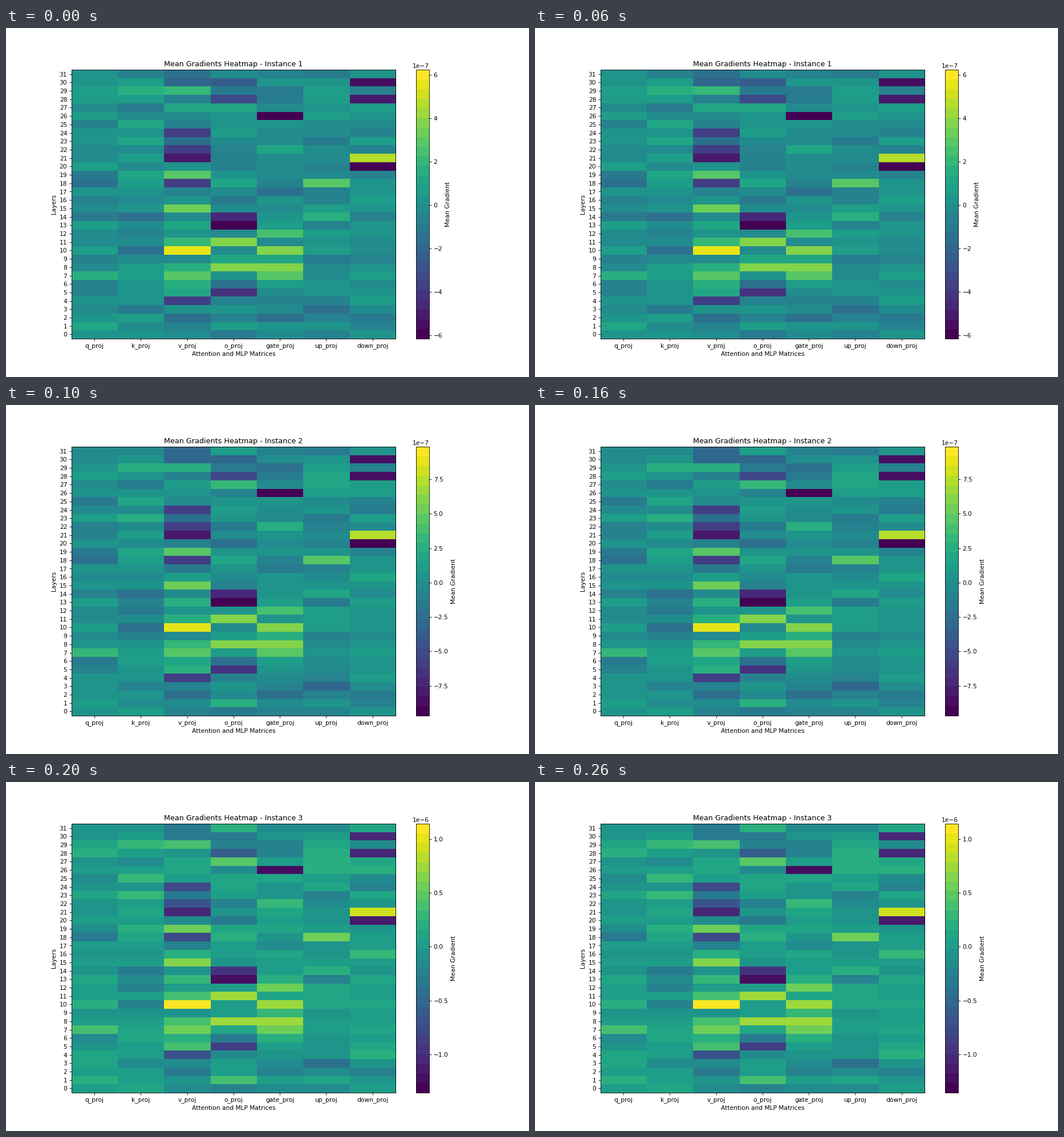
Animation, 917 px wide and 611 px high, one loop 0.3 s. Source, as a matplotlib script:

```python
import numpy as np
import matplotlib.pyplot as plt
from matplotlib.animation import FuncAnimation

W, H = 917, 611
DPI = W / 12
UNIT = 1e-7
LAYERS = 32
NAMES = ["q_proj", "k_proj", "v_proj", "o_proj", "gate_proj", "up_proj", "down_proj"]

# Colour limits of each instance, in UNIT
LIMITS = [(-6.165, 6.235), (-9.66, 9.85), (-13.52, 11.39)]
GROWTH = 2    # gradients double from the first instance to the last
BLEND = [0, 0.6, 1]

# The few strongest cells, layer: first level
PEAKS = {
    "v_proj": {4: -3.6, 7: 3, 10: 5.7, 15: 3.2, 18: -3.7, 19: 3, 21: -5, 22: -3.6, 24: -3.8},
    "o_proj": {5: -4.2, 8: 3.8, 11: 3.6, 13: -6, 14: -4.6, 28: -3.2},
    "gate_proj": {7: 3, 8: 3.8, 10: 3.6, 12: 2.6, 26: -6},
    "up_proj": {18: 2.9},
    "down_proj": {20: -5.8, 21: 4.6, 28: -5.2, 30: -5.3},
}


def make_levels():
    """First and last gradients: seeded noise, widest around v and o, plus peaks."""
    rng = np.random.default_rng(7)
    shape = (LAYERS, len(NAMES))
    spread = 0.7 + 0.6 * np.exp(-(np.arange(len(NAMES)) - 2.5) ** 2)
    first = spread * np.clip(rng.normal(0.1, 1, shape), -2, 2)
    drift = spread * np.clip(rng.normal(0.3, 1, shape), -2, 2)
    for name, cells in PEAKS.items():
        col = NAMES.index(name)
        for layer, level in cells.items():
            first[layer, col] = level
            drift[layer, col] = 0
    return first, GROWTH * first + drift


first, last = make_levels()

fig, ax = plt.subplots(figsize=((W + 0.01) / DPI, (H + 0.01) / DPI), dpi=DPI)
im = ax.imshow(first * UNIT, cmap=plt.get_cmap("viridis", 28), aspect="auto",
               origin="lower", interpolation="nearest",
               vmin=LIMITS[0][0] * UNIT, vmax=LIMITS[0][1] * UNIT)
fig.colorbar(im, ax=ax, label="Mean Gradient")
ax.set_xticks(range(len(NAMES)), NAMES)
ax.set_yticks(range(LAYERS))
ax.set_xlabel("Attention and MLP Matrices")
ax.set_ylabel("Layers")
title = ax.set_title("Mean Gradients Heatmap - Instance 1")


def update(i):
    low, high = LIMITS[i]
    grid = first + (last - first) * BLEND[i]
    im.set_data(grid * UNIT)
    im.set_clim(low * UNIT, high * UNIT)
    title.set_text(f"Mean Gradients Heatmap - Instance {i + 1}")
    return im, title


anim = FuncAnimation(fig, update, frames=len(LIMITS), interval=100,
                     repeat=True, repeat_delay=0, blit=False)
plt.show()
```
